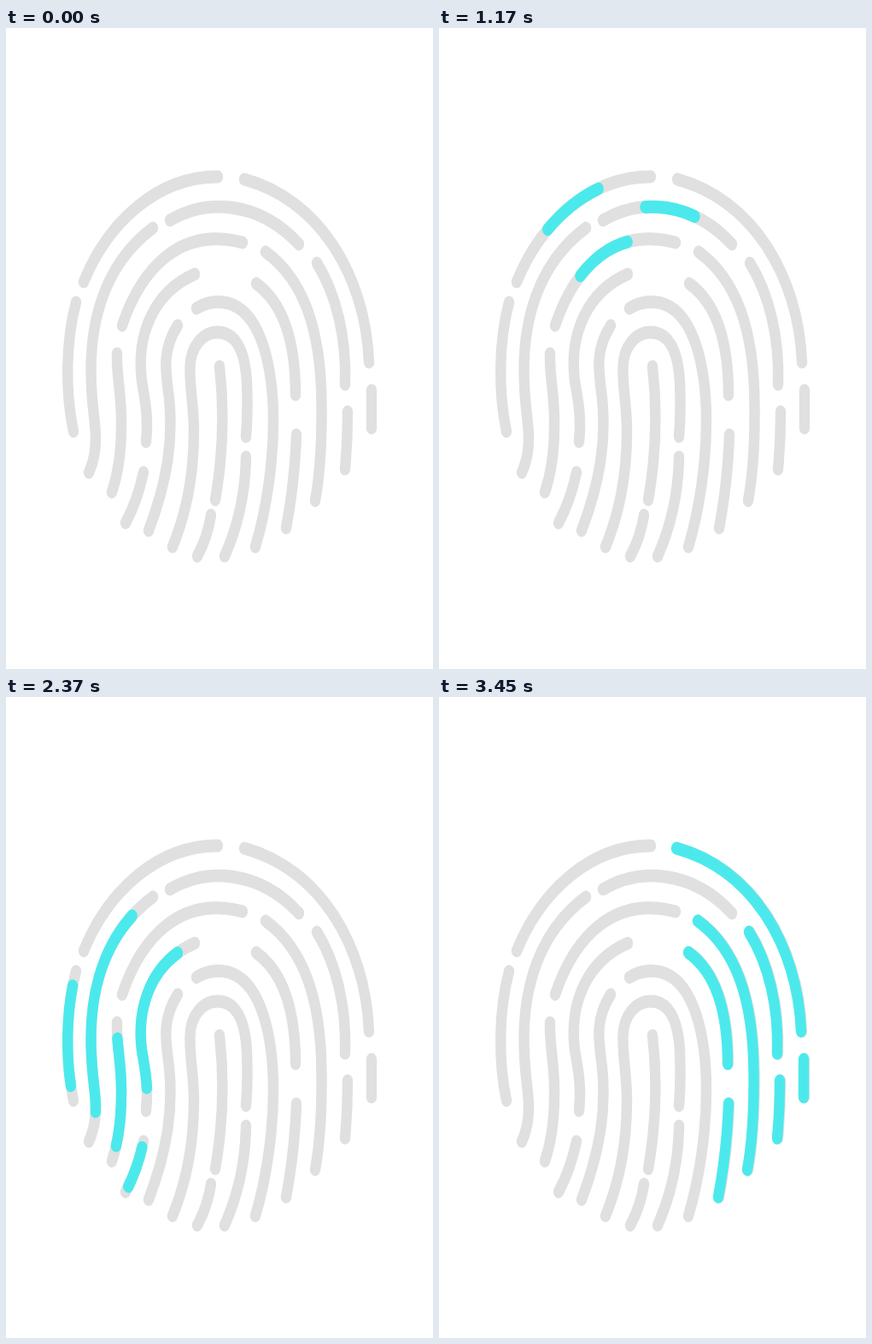
These frames come from a looping animation (500x750 px, 3.63 s). An HTML page:

```html
<!DOCTYPE html>
<html lang="en">
<head>
<meta charset="utf-8">
<title>Fingerprint scan</title>
<style>
  html, body { margin: 0; height: 100%; overflow: hidden; background: #fff; }
  svg { display: block; width: 100%; height: 100%; }
  path { fill: none; stroke-width: 12.4; stroke-linecap: round; }
  #base { stroke: #e0e0e0; }
  #scan { stroke: #4ce9ec; }
</style>
</head>
<body>
<svg viewBox="0 0 500 750">
  <g id="base" transform="scale(1 1.2)"></g>
  <g id="scan" transform="scale(1 1.2)"></g>
</svg>
<script>
const LOOP = 3630, STEP = 30, PHASE = 900, GROW = 740;
const STRETCH = 1.2; // ridges are taller than wide, so pens are scaled vertically

// Ridges in stage coordinates, grouped by the phase that lights them up
const core = [
  'M250,396 C255,440 255,495 245,552',
  'M195,607 C213,563 220,515 220,472 C220,440 215,425 215.5,397 C216,373 230,356 248,356 C268,356 280,376 282,415 C283,440 283,455 281,478',
  'M223,328 C235,320 253,318 266,324 C298,338 313,394 313,460 C313,505 306,560 292,607',
  'M281,502 Q280,564 256,618',
  'M240,570 Q236,596 224,618',
  'M201,348 C182,378 187,402 191,433 C196,482 189,530 167,588',
];
const crown = [
  'M91,297 C120,226 178,174 248,174',
  'M192,225 C236,199 297,203 343,253',
  'M136,348 C159,280 205,232 277,251',
];
const left = [
  'M82,321 C70,366 69,425 79,472',
  'M172,234 C118,274 96,340 100,418 C101,446 105,462 105,480 C105,497 102,509 97,520',
  'M130,381 C129,408 136,431 135,466 C135,495 131,522 124,543',
  'M221,288 C175,308 152,356 159,413 C163,437 167,455 164,484',
  'M161,520 Q154,553 140,579',
];
const right = [
  'M279,177 C367,201 421,290 425,391',
  'M304,262 C348,294 369,352 369.5,440 C370,484 368,520 362,553',
  'M293,299 C325,322 339,367 339,429',
  'M364,275 C387,312 399,363 397,417',
  'M428,424 L428,468',
  'M400,449 Q400,484 397,516',
  'M340,476 Q338,532 328,585',
];

function addRidge(parent, d) {
  const path = document.createElementNS('http://www.w3.org/2000/svg', 'path');
  path.setAttribute('d', d.replace(/,([\d.]+)/g, (_, y) => ',' + y / STRETCH));
  path.setAttribute('pathLength', 1);
  return parent.appendChild(path);
}

const base = document.getElementById('base');
const scan = document.getElementById('scan');
const phases = [core, crown, left, right].map(ridges => ridges.map(d => {
  addRidge(base, d);
  const path = addRidge(scan, d);
  if (ridges === right) path.setAttribute('transform', 'translate(-1 0)');
  return path;
}));

function draw(now) {
  const t = Math.floor(now % LOOP / STEP) * STEP;
  const active = Math.min(3, Math.floor(t / PHASE));
  const p = Math.min(1, (t - active * PHASE) / GROW);
  phases.forEach((paths, i) => paths.forEach(path => {
    path.style.display = i === active && p > 0 ? '' : 'none';
    // Grow from the middle of the ridge towards both ends
    path.style.strokeDasharray = `${p} 2`;
    path.style.strokeDashoffset = (p - 1) / 2;
  }));
}

const start = performance.now();
function tick() {
  draw(performance.now() - start);
  requestAnimationFrame(tick);
}
tick();
</script>
</body>
</html>
```
